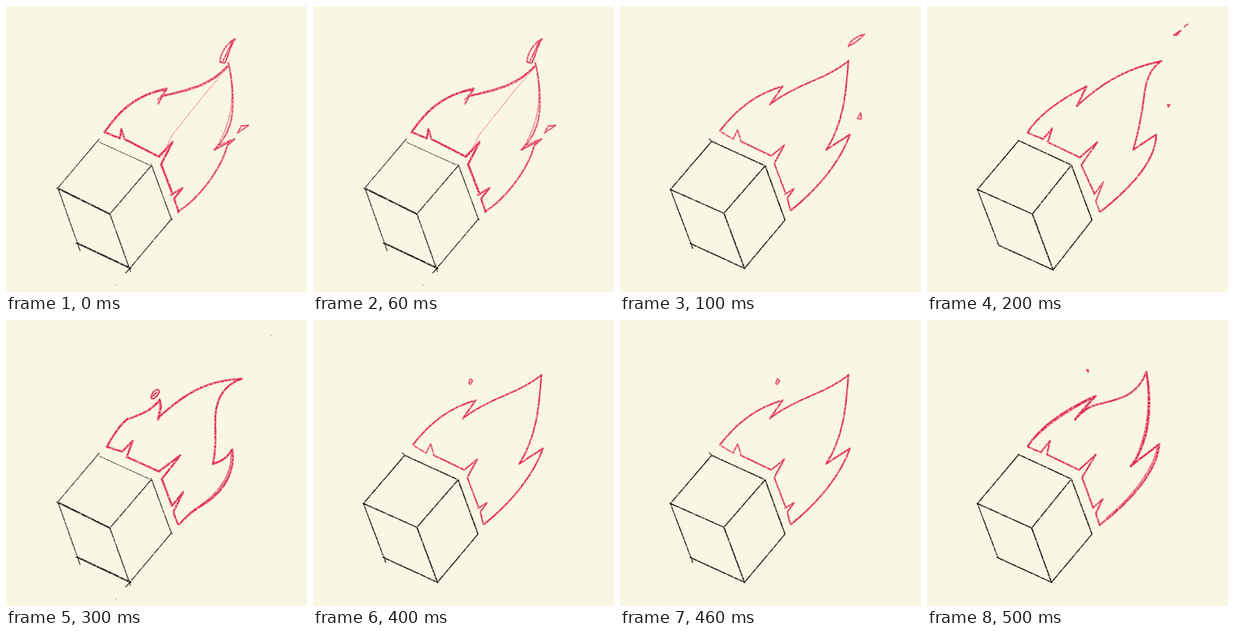
Write an HTML page that moves like this. It is 394 px wide and 374 px high and loops after 600 ms.

```html
<!DOCTYPE html>
<html lang="en">
<head>
<meta charset="utf-8">
<title>Burning cube</title>
<style>
  html, body { margin: 0; width: 100%; height: 100%; overflow: hidden; background: #f9f6e4; }
  svg { display: block; width: 100vw; height: 100vh; }
  path { fill: none; stroke-linecap: round; stroke-linejoin: round; }
</style>
</head>
<body>
<svg id="stage" viewBox="0 0 394 374">
  <defs>
    <!-- Soft, slightly grainy pencil edge -->
    <filter id="pencil" filterUnits="userSpaceOnUse" x="0" y="0" width="394" height="374" color-interpolation-filters="sRGB">
      <feTurbulence type="fractalNoise" baseFrequency=".4" numOctaves="2" seed="4" result="grain"/>
      <feDisplacementMap in="SourceGraphic" in2="grain" scale="1.6" xChannelSelector="R" yChannelSelector="G" result="rough"/>
      <feColorMatrix in="grain" values="0 0 0 0 0  0 0 0 0 0  0 0 0 0 0  0 0 2 0 -.1" result="mask"/>
      <feComposite in="rough" in2="mask" operator="in"/>
      <feGaussianBlur stdDeviation=".3"/>
    </filter>
  </defs>
  <rect width="394" height="374" fill="#f9f6e4"/>
  <g id="drawing" filter="url(#pencil)"></g>
</svg>
<script>
const NS = 'http://www.w3.org/2000/svg';
const INK = '#1c1b17', RED = '#de1c42';
const HOLD = 100;

// A stroke is [path, width, opacity, colour].
const ink = (d, w = 1.5, o = 1) => [d, w, o, INK];
const red = (d, w = 1.8, o = .95) => [d, w, o, RED];

// Corners: top, left, front, right, low right, bottom, low left.
function cube(t, l, f, r, lr, b, ll) {
  return [
    ink(`M${t} L${l}`), ink(`M${l} L${f}`), ink(`M${f} L${r}`, 1.6),
    ink(`M${t} L${r}`), ink(`M${r} L${lr}`, 1.7), ink(`M${lr} L${b}`),
    ink(`M${l} L${ll}`), ink(`M${ll} L${b}`), ink(`M${f} L${b}`, 1.8)
  ];
}

const looseCube = [
  ink('M122 174 L67 239', 1.2, .8), ink('M67 238 L136 272', 2.1),
  ink('M136 272 L190 209', 1.4, .9), ink('M122 178 L190 209', 1.2, .75),
  ink('M190 207 L217 280', 1.4, .85), ink('M217 278 L157 349', 1.4, .85),
  ink('M68 238 L97 320', 1.4, .85), ink('M93 310 L163 343', 2.1),
  ink('M136 272 L163 347', 1.5, .9)
];
const crispCube = [
  ...cube('120 177', '66 240', '136 271', '190 209', '216 280', '163 343', '93 311'),
  ink('M117 174 L122 178'), ink('M93 310 L95 317', 1.3)
];
const tallCube = cube('120 176', '66 240', '138 272', '189 208', '216 280', '165 345', '94 313');
const plainCube = cube('120 176', '66 240', '137 272', '189 208', '216 280', '163 343', '93 311');

const pointedFlame = [
  red('M131 163 C150 138 176 115 213 105 L196 129 Q213 115 250 99 Q282 86 299 72', 1.7),
  red('M299 72 C296 112 293 153 270 188 L301 168 C290 200 261 238 224 267', 1.7),
  red('M133 165 L148 174 L154 162 L158 175', 1.4, .8),
  red('M158 177 L198 196 L215 182 L203 204', 1.6),
  red('M202 206 L216 243', 1.5), red('M216 246 L228 239 L219 251 L223 267', 1.5)
];

const poses = [
  [
    ...looseCube,
    red('M129 165 C147 139 168 117 210 108', 2),
    red('M140 150 C160 124 184 113 209 110', 1.3, .6),
    red('M210 108 L199 128 L204 118 C229 112 266 108 291 78', 1.7, .8),
    red('M211 109 L198 123 M205 117 C238 109 267 103 289 79', 1.2, .6),
    red('M291 74 C297 100 300 133 293 156 Q287 174 273 188', 1.7, .75),
    red('M294 88 C298 119 297 150 275 186', 1.1, .5),
    red('M273 188 L299 174 L290 182 C281 215 251 253 225 269', 1.8, .8),
    red('M275 184 L294 175', 1.2, .6),
    red('M291 79 L262 113 L218 168 L204 196', 1, .35),
    red('M129 165 L149 173 L151 161 L155 174 L200 197', 2),
    red('M200 197 L218 178 L203 207 L217 243', 2.2),
    red('M216 247 L231 238 L220 252 L226 269', 2),
    red('M300 43 C288 49 281 62 280 73 L286 75 C292 66 291 56 300 43 M296 47 L284 72', 1.5, .85),
    red('M303 166 L308 157 L318 156 Z', 1.4, .85),
    ink('M144 365 h.6', 1, .45)
  ],
  [
    ...crispCube, ...pointedFlame,
    red('M299 53 Q302 42 320 37 Q312 46 299 53', 1.4, .85),
    red('M311 147 L315 140 L316 148 Z', 1.4, .85)
  ],
  [
    ...tallCube,
    red('M132 165 C142 148 168 125 209 105 L196 131 C224 105 257 82 307 72'),
    red('M307 72 C291 82 286 100 284 120 Q279 158 270 188 L300 168 C300 196 278 229 227 269'),
    red('M132 166 L152 174 L164 160 L158 178 L200 198', 1.7),
    red('M200 198 L223 178 L202 208 L219 245', 1.7),
    red('M219 246 L231 230 L221 255 L226 269', 1.5, .85),
    red('M323 38 L332 32 L327 38 Z', 1.5), red('M337 27 L341 24', 1.5),
    red('M315 129 L318 129 L316 132 Z', 1.4, .85)
  ],
  [
    ...looseCube,
    red('M132 166 Q146 140 158 130 C177 124 192 117 201 104 L203 113 L199 130', 2),
    red('M134 162 Q146 140 160 129 M186 119 L202 106 L200 125', 1.5, .7),
    red('M199 128 C228 102 257 79 308 77', 2),
    red('M308 77 C284 86 276 103 274 125 C274 152 275 169 271 188', 2),
    red('M271 188 Q288 184 296 169 C301 196 287 222 262 239 Q242 250 227 267', 2),
    red('M295 174 C296 197 284 220 262 237 L241 252', 1.6, .7),
    red('M132 166 L152 172 L166 158 L158 179 L200 198', 2),
    red('M200 198 L228 177 L204 208 L217 242', 2.1),
    red('M217 243 L232 225 L219 251 L225 267', 2),
    red('M190 101 Q191 93 198 91 Q204 92 196 101 Q190 105 190 101 L197 95', 1.6),
    ink('M347 20 h.6', 1.2, .8), ink('M144 365 h.6', 1, .45)
  ],
  [
    ...crispCube, ...pointedFlame,
    red('M204 82 L206 77 L209 79 L206 84 Z', 1.4, .85)
  ],
  [
    ...plainCube,
    red('M132 165 C148 140 181 117 221 99 L194 130', 2),
    red('M138 157 C157 137 181 120 217 102 L196 126', 1.5, .7),
    red('M194 130 Q208 113 225 110 C251 104 276 99 287 68', 1.9),
    red('M287 68 C293 96 292 130 285 155 Q279 176 267 191', 2.2),
    red('M289 82 C291 112 290 142 274 180', 1.5, .7),
    red('M267 191 L304 162 C302 195 270 235 226 268', 2),
    red('M270 187 L302 165 C297 194 270 230 236 258', 1.5, .65),
    red('M132 166 L149 173 L161 158 L157 176 L199 196', 1.7),
    red('M199 196 L221 176 L203 206 L217 244', 1.7),
    red('M217 246 L230 234 L221 253 L226 268', 1.7),
    red('M209 65 L211 65 L211 68 Z', 1.5, .9)
  ]
];

const drawing = document.getElementById('drawing');

function addPath(parent, d, width, opacity, colour) {
  const path = document.createElementNS(NS, 'path');
  path.setAttribute('d', d);
  path.setAttribute('stroke', colour);
  path.setAttribute('stroke-width', width);
  path.setAttribute('opacity', opacity);
  parent.appendChild(path);
}

const layers = poses.map(strokes => {
  const g = document.createElementNS(NS, 'g');
  for (const [d, width, opacity, colour] of strokes) {
    // Faint side of the lead under the red line.
    if (colour === RED) addPath(g, d, width * 1.7, opacity * .35, colour);
    addPath(g, d, width, opacity, colour);
  }
  drawing.appendChild(g);
  return g;
});

function render(ms) {
  const current = Math.floor(ms / HOLD) % layers.length;
  layers.forEach((g, i) => g.style.display = i === current ? '' : 'none');
}

const start = performance.now();
function tick() {
  render(performance.now() - start);
  requestAnimationFrame(tick);
}
render(0);
requestAnimationFrame(tick);
</script>
</body>
</html>
```
